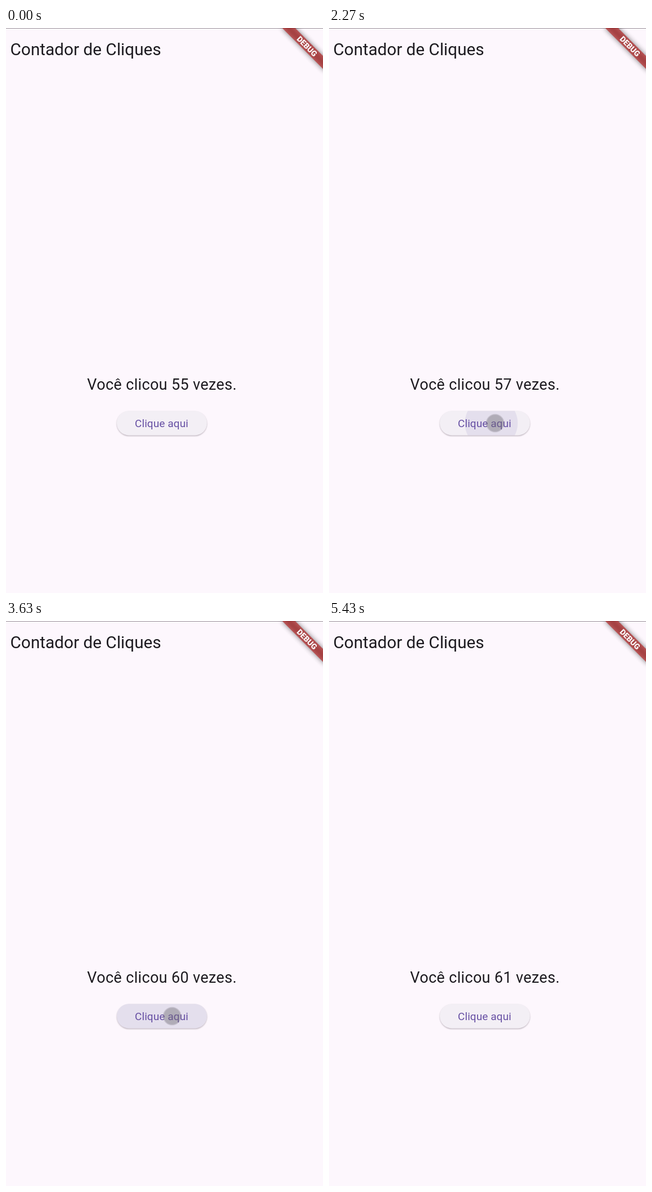
An HTML page that plays this animation: 561x998 px, repeating every 5.49 s.

```html
<!DOCTYPE html>
<html lang="pt">
<head>
<meta charset="utf-8">
<title>Contador de Cliques</title>
<style>
  html, body { margin: 0; width: 100%; height: 100%; overflow: hidden; background: #fdf7fd; }
  svg { display: block; width: 561px; height: 998px; font-family: Roboto, sans-serif; fill: #1d1b20; }
</style>
</head>
<body>
<svg viewBox="0 0 561 998">
  <defs>
    <filter id="soft" x="-50%" y="-150%" width="200%" height="400%"><feGaussianBlur stdDeviation="5"/></filter>
    <filter id="lift" x="-10%" y="-20%" width="120%" height="140%"><feGaussianBlur stdDeviation="0.9"/></filter>
    <clipPath id="pill"><rect x="196" y="676.3" width="159.6" height="43.2" rx="21.6"/></clipPath>
  </defs>
  <rect width="561" height="1" fill="#989198"/>
  <text x="7.5" y="47.7" font-size="29.63">Contador de Cliques</text>

  <g transform="translate(565 0) rotate(45)">
    <rect x="-53.9" y="37.7" width="107.8" height="16.2" fill="#000" opacity=".5" filter="url(#soft)"/>
    <rect x="-53.9" y="37.7" width="107.8" height="16.2" fill="#b71c1c" opacity=".627"/>
    <text y="50.6" font-size="13.74" font-weight="900" text-anchor="middle" fill="#fff">DEBUG</text>
  </g>

  <text id="count" x="143.6" y="639" font-size="26.94" letter-spacing=".337"></text>

  <rect x="196" y="677.8" width="159.6" height="43" rx="21.5" fill="#50404f" opacity=".36" filter="url(#lift)"/>
  <rect x="196" y="676.3" width="159.6" height="43.2" rx="21.6" fill="#f3eff5"/>
  <g id="ripples" clip-path="url(#pill)" fill="#6750a4"></g>
  <text x="228" y="704.6" font-size="18.86" letter-spacing=".135" fill="#6750a4">Clique aqui</text>

  <g id="cursor">
    <circle r="16.3" fill="#6e6970" opacity=".25"/>
    <circle r="14.8" fill="#6e6970" opacity=".24"/>
  </g>
</svg>
<script>
const LOOP = 5490, FIRST = 55, HOLD = 80;
const releases = [1755, 2236, 2625, 3010, 3410, 3815];
const tap = [294, 698], middle = [275.8, 697.9], reach = 83;

// time, x, y
const path = [
  [130, 20, 904], [400, 45, 880], [670, 84, 840], [750, 130, 795], [830, 179, 744],
  [950, 245, 714], [1080, 312, 701], [1230, 358, 697], [1270, 345, 697], [1300, 297, 698],
  [1530, 294, 698], [3900, 294, 698], [3930, 306, 706], [3970, 333, 732],
  [4040, 402, 755], [4130, 544, 767], [4165, 544, 767]
];

const $ = id => document.getElementById(id);
const clamp = v => Math.min(1, Math.max(0, v));
const mix = (a, b, k) => a + (b - a) * k;

// cubic-bezier(.25, .1, .25, 1)
function ease(x) {
  const bez = (a, b, s) => 3 * a * s * (1 - s) ** 2 + 3 * b * s * s * (1 - s) + s ** 3;
  let lo = 0, hi = 1;
  for (let i = 0; i < 20; i++) {
    const s = (lo + hi) / 2;
    if (bez(.25, .25, s) < x) lo = s; else hi = s;
  }
  return bez(.1, 1, lo);
}

const ripples = releases.map(() =>
  $('ripples').appendChild(document.createElementNS('http://www.w3.org/2000/svg', 'circle')));

function drawRipple(el, age) {
  const held = clamp((age + HOLD) / HOLD) * HOLD / 1000;
  const k = ease(clamp(held + Math.max(0, age) / 225));
  const fade = clamp((age + HOLD) / 75) * clamp((375 - age) / 150);
  el.setAttribute('cx', mix(tap[0], middle[0], k));
  el.setAttribute('cy', mix(tap[1], middle[1], k));
  el.setAttribute('r', reach * mix(.3, 1, k));
  el.setAttribute('opacity', .1 * fade);
}

function drawCursor(t) {
  const i = path.findIndex(p => p[0] > t);
  $('cursor').style.display = i > 0 ? '' : 'none';
  if (i < 1) return;
  const [t0, x0, y0] = path[i - 1], [t1, x1, y1] = path[i];
  const k = (t - t0) / (t1 - t0);
  $('cursor').setAttribute('transform', `translate(${mix(x0, x1, k)} ${mix(y0, y1, k)})`);
}

function draw(now) {
  const t = now % LOOP;
  const clicks = FIRST + releases.filter(r => r <= t).length;
  $('count').textContent = `Você clicou ${clicks} vezes.`;
  ripples.forEach((el, i) => drawRipple(el, t - releases[i]));
  drawCursor(t);
}

const start = performance.now();
function tick() {
  draw(performance.now() - start);
  requestAnimationFrame(tick);
}
tick();
</script>
</body>
</html>
```
